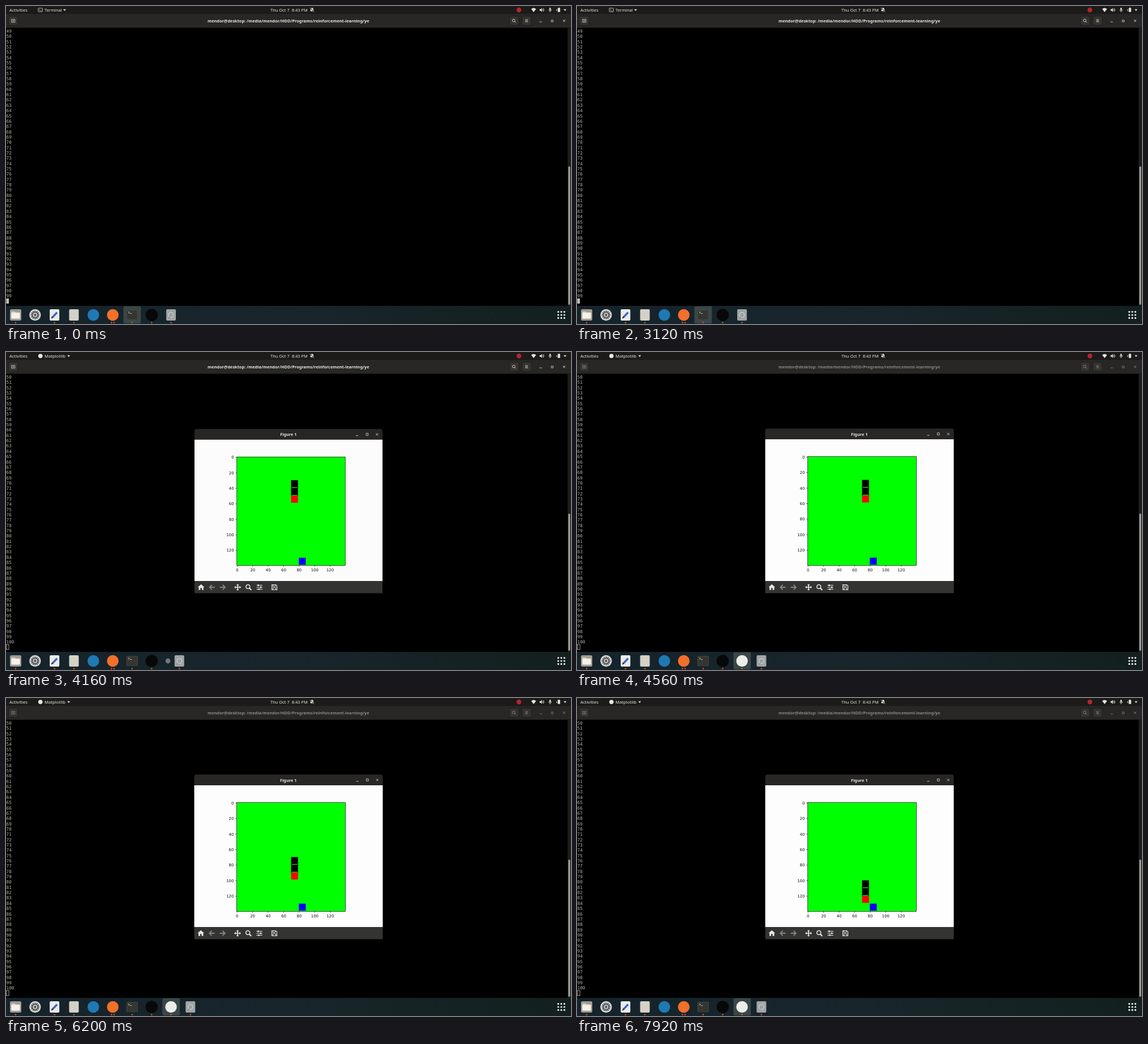
These frames come from a looping animation (998 by 561 pixels, 8000 ms). An HTML page:

```html
<!DOCTYPE html>
<html lang="en">
<head>
<meta charset="utf-8">
<title>Terminal and plot</title>
<style>
html, body { margin: 0; width: 100%; height: 100%; overflow: hidden; background: #000; }
svg { display: block; width: 998px; height: 561px; }
text { font-family: "Noto Sans", "Open Sans", sans-serif; font-size: 7.5px; fill: #e6e6e2; white-space: pre; }
.bold { font-weight: 700; font-size: 7.35px; }
.mono { font-family: "DejaVu Sans Mono", monospace; font-size: 7.75px; fill: #b4b4ae; }
.tick { font-family: "DejaVu Sans", sans-serif; font-size: 6.9px; fill: #111; }
.mid { text-anchor: middle; }
.end { text-anchor: end; }
</style>
</head>
<body>
<svg id="stage" viewBox="0 0 998 561" xmlns="http://www.w3.org/2000/svg"></svg>
<script>
const LOOP = 8000;
const FOCUS = 4040;          // the plot takes focus, the terminal scrolls
const OPEN = 4080, OPEN_MS = 95;
const DOCK = 4112, DOCK_MS = 200;
const DIM = 4160, DIM_MS = 150;
const MOVES = [4600, 5080, 5560, 6040, 6600, 6960, 7520];
const ROWS = 51, ROW_H = 9.35;
const UNIT = 192 / 140, AX = 407.5, AY = 184.5;

const rect = (x, y, w, h, fill, more = '') =>
  `<rect x="${x}" y="${y}" width="${w}" height="${h}" fill="${fill}" ${more}/>`;
const disc = (x, y, r, fill, more = '') =>
  `<circle cx="${x}" cy="${y}" r="${r}" fill="${fill}" ${more}/>`;
const line = (d, color = '#deded9', w = 1, more = '') =>
  `<path d="${d}" fill="none" stroke="${color}" stroke-width="${w}" ${more}/>`;
const shape = (d, fill = '#e6e6e2') => `<path d="${d}" fill="${fill}"/>`;
const label = (x, y, s, cls = '', more = '') =>
  `<text x="${x}" y="${y}" class="${cls}" ${more}>${s}</text>`;
const group = (id, body, more = '') => `<g id="${id}" ${more}>${body}</g>`;
const at = (x, y, body) => `<g transform="translate(${x} ${y})">${body}</g>`;
const dot = x => disc(x, 558.6, 1.3, '#e2521f');

function topBar() {
  return rect(0, 0, 998, 14, '#1c1b19') +
    label(6, 9.7, 'Activities', '', 'style="font-size:7.7px"') +
    group('appTerm',
      rect(57, 3.8, 7.4, 6.4, 'none', 'rx="1" stroke="#deded9" stroke-width=".8"') +
      line('M58.6 5.6l1.5 1.3-1.5 1.3M60.9 8.5h1.8', '#deded9', .7) +
      label(68, 9.7, 'Terminal') + shape('M101 5.7h5l-2.5 3z')) +
    group('appPlot',
      disc(60.8, 7, 3.8, '#e8e8e4') +
      label(68, 9.7, 'Matplotlib', '', 'style="font-size:7.7px"') + shape('M108.2 5.7h5l-2.5 3z')) +
    label(467, 9.7, 'Thu Oct 7  8:43 PM') +
    shape('M537 9c1-1 1-2 1-3.2a2.5 2.5 0 0 1 5 0c0 1.200 0 2.200 1 3.200zM539.5 9.600h2l-1 1z') +
    line('M536.800 3l7.400 7.600', '#1c1b19', 1.500) + line('M536.800 3.200l7.400 7.600', '#e6e6e2', .8) +
    disc(906, 7, 4.2, '#b3262c') +
    shape('M927.700 5.200q4.300-3.600 8.600 0l-4.300 5.600z') +
    shape('M942.500 5.700h1.700l2.300-2.200v7l-2.300-2.200h-1.700z') +
    line('M947.700 5.200q1.300 1.800 0 3.600M949.100 4q2.300 3 0 6', '#deded9', .9) +
    rect(959.9, 3, 2.4, 4.8, '#e6e6e2', 'rx="1.2"') +
    line('M958.600 6.300q0 2.600 2.500 2.600t2.500-2.600M961.100 9v2', '#deded9', .8) +
    line('M972.600 5.500v3.500', '#deded9', .9) +
    rect(974.6, 3.6, 4.2, 7, '#e6e6e2', 'rx=".7"') + rect(975.8, 2.7, 1.8, 1, '#e6e6e2') +
    shape('M985 5.700h5l-2.500 3z');
}

function titleBar() {
  const button = x => rect(x - 8, 18, 16.5, 16, '#343330', 'rx="2.5" stroke="#1b1a18" stroke-width=".8"');
  const body = label(498.8, 28.6, 'mendor@desktop: /media/mendor/HDD/Programs/reinforcement-learning/ye', 'bold mid') +
    line('M9.800 28.600v-5h6v5zM12.800 24.600v2.800M11.400 26h2.800', '#deded9', .8) +
    disc(896.8, 25.5, 2.3, 'none', 'stroke="#deded9" stroke-width=".9"') +
    line('M898.500 27.200l2 2', '#deded9', 1) +
    line('M917 24h5M917 26h5M917 28h5', '#deded9', .8) +
    line('M942.500 28h4', '#deded9', .9) +
    line('M963.200 24.800h3.200v3.200h-3.200z', '#deded9', .8) +
    line('M983.900 24.200l3.800 3.800M987.700 24.200l-3.800 3.800', '#deded9', .9);
  return rect(0, 14, 998, 24.5, '#282725') + rect(0, 37.8, 998, .7, '#161514') +
    button(12.5) + button(897.3) + button(919.3) + group('termHead', body);
}

function terminal() {
  let rows = '';
  for (let i = 0; i < ROWS; i++) rows += label(.5, 46.9 + i * ROW_H, '', 'mono', 'data-row="1"');
  return rect(0, 38.5, 998, 490.500, '#000') + rows +
    rect(992, 38.5, 6, 490.5, '#1d1d1b') +
    rect(993.3, 283, 3.2, 244, '#a3a39f', 'rx="1.6" id="thumb"') +
    rect(.5, 516, 4.6, 9, '#c4c4be', 'id="cursor" stroke-width=".8"');
}

function gear() {
  let teeth = '';
  for (let a = 0; a < 360; a += 30) teeth += rect(-1.1, -7.6, 2.2, 3, '#55585a', `transform="rotate(${a})"`);
  return disc(0, 0, 10.2, '#d6d6d2') + teeth + disc(0, 0, 5.6, '#55585a') +
    disc(0, 0, 3.8, '#d6d6d2') + disc(0, 0, 2.200, '#55585a');
}

function dock() {
  const y = 545;
  const files = rect(-10, -10, 20, 20, '#a29b8d', 'rx="2.5"') +
    shape('M-7.500-6h6l1.500 1.500h7.500v11h-15z', '#d9d4c8') + rect(-7.5, -3.500, 15, 10, '#f4f2ec', 'rx=".8"');
  const pen = rect(-8.5, -10, 17, 20, '#ecebe8', 'rx="2"') +
    line('M-3.500 4.200L4.500-4.500', '#3766c9', 3.4) + shape('M-5.800 6.400l1-3.800 2.700 2.500z', '#222');
  const term = rect(-10, -8.7, 20, 17.500, '#4a4a45', 'rx="1.500"') + rect(-9, -7.8, 18, 15.700, '#353630', 'rx="1"') +
    line('M-6.800-5.800l2.200 1.500-2.200 1.500M-3.800-2.400h3', '#e6e6e2', .8);
  const drive = rect(-8.5, -10, 17, 20, '#a3a6a6', 'rx="2"') +
    disc(0, 0, 6.300, '#b9bcbc', 'stroke="#858989" stroke-width=".7"') +
    disc(0, 0, 2.400, '#a3a6a6', 'stroke="#777b7b" stroke-width=".7"') +
    line('M-5 6.500l4-4', '#777b7b', 1);
  let grid = '';
  for (let i = 0; i < 9; i++) grid += disc(975.5 + i % 3 * 5.4, 539.6 + Math.floor(i / 3) * 5.4, 1.6, '#f0f0ee');
  return rect(0, 529, 998, 32, 'url(#dockFill)') +
    rect(207.500, 529.8, 30.800, 30.200, '#3a4748', 'rx="2" id="litTerm"') +
    rect(276.300, 529.8, 30.800, 30.200, '#3a4748', 'rx="2" id="litPlot"') +
    at(17, y, files) + at(51.4, y, gear()) + at(85.7, y, pen) +
    rect(111.500, 535, 17, 20, '#d5d1c6', 'rx="2"') +
    disc(154.300, y, 10.300, '#1f79b4') +
    disc(188.600, y, 10.300, '#f1702a') +
    at(222.800, y, term) +
    disc(257.300, y, 10.800, '#080808') +
    [17, 85.700, 120, 186.300, 190.900, 222.800, 257.300].map(dot).join('') +
    group('plotIcon', disc(0, 0, 10.200, '#ededea')) +
    group('plotDot', dot(291.500)) +
    group('drive', at(291.500, y, drive) + dot(291.500)) + grid;
}

function toolbar() {
  const c = '#e8e8e4', off = '#85857f';
  const home = shape('M0-5.200l5.800 5.200h-1.600v4.800h-2.900v-3.500h-2.600v3.500h-2.900v-4.800h-1.600z', c);
  const arrow = line('M5 0h-9M0-4.300L-4.300 0 0 4.300', off, 1.900);
  const move = line('M-4.500 0h9M0-4.500v9', c, 1.600) +
    shape('M0-6l2.400 2.600h-4.800zM0 6l2.400-2.600h-4.800zM-6 0l2.600-2.400v4.800zM6 0l-2.600-2.400v4.800z', c);
  const zoom = disc(-1, -1, 3.500, 'none', `stroke="${c}" stroke-width="1.600"`) + line('M1.500 1.500l3.500 3.500', c, 2.200);
  const sliders = line('M-5.200-3.500H5.200M-5.200 0H5.200M-5.200 3.500H5.200', c, 1.100) +
    line('M-2-5v3M2.500-1.500v3M-1 2v3', c, 1.900);
  const save = line('M-4.500-4.500h7l2 2v7h-9z', c, 1.200) +
    line('M-2.500-4v2.800h4v-2.800M-2.500 4.500v-3.500h5v3.500', c, 1);
  return at(344.200, 415, home) + at(363.500, 415, arrow) +
    at(382.500, 415, `<g transform="scale(-1 1)">${arrow}</g>`) + at(409, 415, move) +
    at(428.200, 415, zoom) + at(447.600, 415, sliders) + at(474, 415, save);
}

function axes() {
  const cell = 9 * UNIT;
  let out = rect(AX, AY, 192, 192, '#0f0');
  for (let v = 0; v < 140; v += 20) {
    const x = AX + (v + .5) * UNIT, y = AY + (v + .5) * UNIT;
    out += line(`M${x} 376.500v2.500M${AX} ${y}h-2.500`, '#000', .6) +
      label(x, 387.100, v, 'tick mid') + label(402.300, y + 2.500, v, 'tick end');
  }
  const x = 70 * UNIT;
  const snake = rect(x, 0, cell, 20 * UNIT, '#000') +
    rect(x + 1.100, 9 * UNIT, cell - 2.200, UNIT, '#1fd01f') +
    rect(x + 1.100, 19 * UNIT, cell - 2.200, UNIT, '#1fd01f') +
    rect(x, 20 * UNIT, cell, cell, '#f00');
  return out + group('snake', snake) +
    rect(AX + 80 * UNIT, AY + 130 * UNIT, cell, cell, '#00f') +
    rect(AX, AY, 192, 192, 'none', 'stroke="#000" stroke-width=".7"');
}

function figure() {
  return shape('M332.500 154.500v-15.500q0-4 4-4h325q4 0 4 4v15.500z', '#282725') +
    label(498.800, 147.700, 'Figure 1', 'bold mid') +
    line('M618.500 147h4', '#deded9', .9) +
    line('M636.400 142.700h3.700v3.700h-3.700z', '#deded9', .8) +
    line('M653.900 142.700l3.800 3.800M657.700 142.700l-3.800 3.800', '#deded9', .9) +
    rect(332.500, 154, 333, 250, '#fdfdfd') +
    rect(332.500, 404, 333, 21.500, '#343432') + axes() + toolbar();
}

const stage = document.getElementById('stage');
stage.innerHTML =
  `<defs><linearGradient id="dockFill"><stop offset="0" stop-color="#15232c"/>
   <stop offset=".5" stop-color="#18252b"/><stop offset="1" stop-color="#13201f"/></linearGradient></defs>` +
  terminal() + titleBar() + topBar() + dock() + group('figure', figure());

const el = {};
stage.querySelectorAll('[id]').forEach(n => el[n.id] = n);
const rows = [...stage.querySelectorAll('[data-row]')];
const set = (id, attrs) => { for (const k in attrs) el[id].setAttribute(k, attrs[k]); };
const show = (id, on) => set(id, { visibility: on ? 'visible' : 'hidden' });
const span = (t, start, ms) => Math.min(1, Math.max(0, (t - start) / ms));
const outQuad = p => p * (2 - p);
const outExpo = p => p >= 1 ? 1 : 1 - 2 ** (-10 * p);
let first = 0;

function draw(t) {
  const away = t >= FOCUS;
  const start = away ? 50 : 49;
  if (start !== first) {
    first = start;
    rows.forEach((r, i) => r.textContent = start + i);
  }
  show('appTerm', !away);
  show('appPlot', away);
  set('thumb', { y: away ? 285 : 283, height: away ? 242 : 244 });
  set('cursor', { fill: away ? 'none' : '#c4c4be', stroke: away ? '#c4c4be' : 'none' });
  set('termHead', { opacity: 1 - .5 * span(t, DIM, DIM_MS) });

  const open = outExpo(span(t, OPEN, OPEN_MS));
  const sx = .01 + .99 * open, sy = .05 + .95 * open;
  show('figure', open > 0);
  set('figure', { opacity: open, transform: `translate(499 425.5) scale(${sx} ${sy}) translate(-499 -425.5)` });

  const slot = outQuad(span(t, DOCK, DOCK_MS));
  show('plotIcon', slot > 0);
  set('plotIcon', { opacity: slot, transform: `translate(${282 + 9.5 * slot} 545) scale(${slot})` });
  set('drive', { transform: `translate(${34.3 * slot} 0)` });
  show('plotDot', slot >= 1);
  show('litPlot', slot >= 1);
  show('litTerm', t < DIM - 40);

  const steps = MOVES.filter(m => t >= m).length;
  set('snake', { transform: `translate(${AX} ${AY + (30 + 10 * steps) * UNIT})` });
}

const began = performance.now();
function tick() {
  draw((performance.now() - began) % LOOP);
  requestAnimationFrame(tick);
}
draw(0);
requestAnimationFrame(tick);
</script>
</body>
</html>
```
